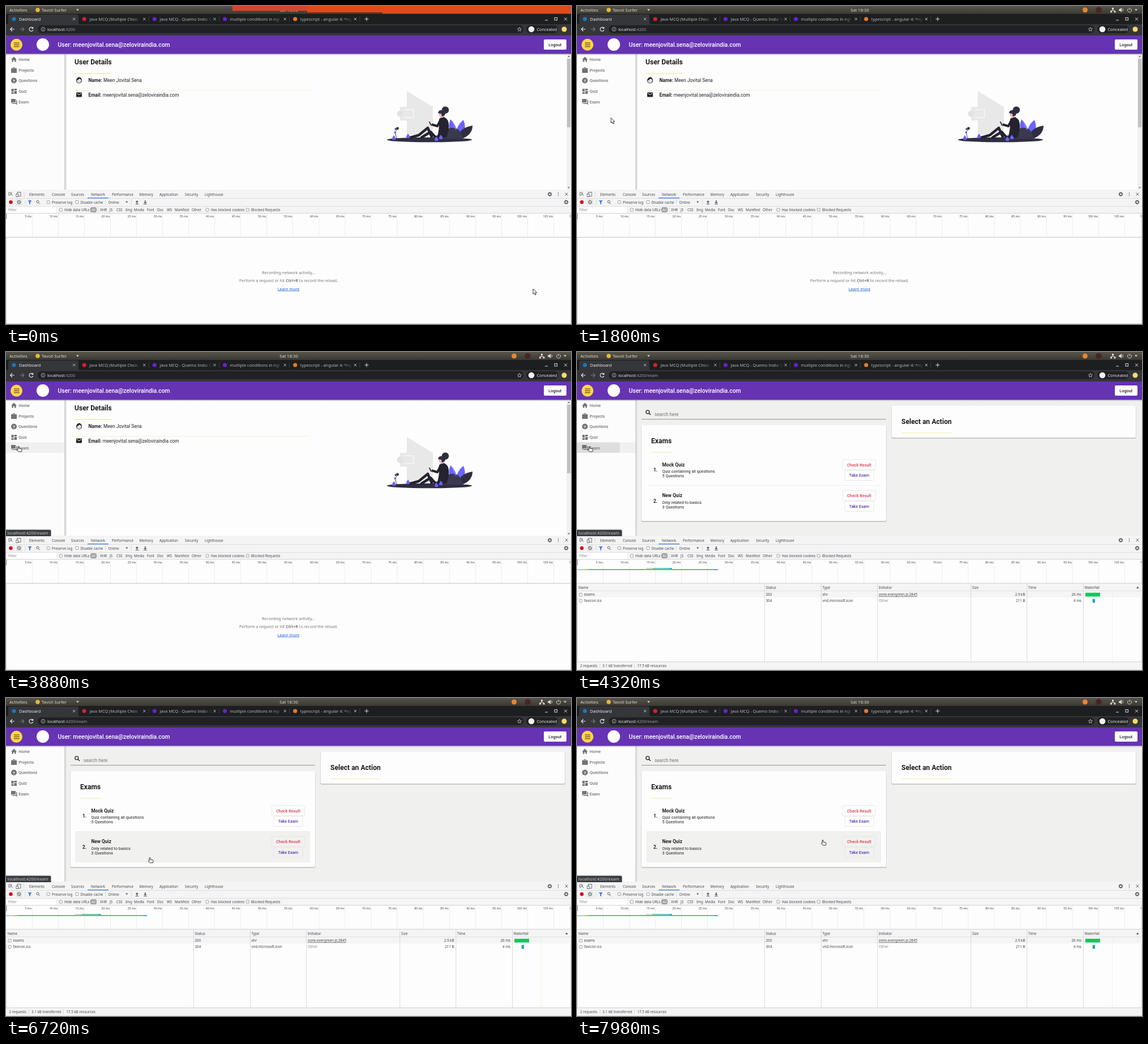
Recreate the animation shown at these times as an HTML page. Size 998x561 px, loop 8 s.

```html
<!DOCTYPE html>
<html lang="en">
<head>
<meta charset="utf-8">
<title>Exam dashboard</title>
<style>
html, body { margin: 0; width: 100%; height: 100%; overflow: hidden; background: #fdfdfd; }
svg { display: block; width: 100vw; height: 100vh; }
svg svg { width: auto; height: auto; }
text { white-space: pre; }
.ui { font-family: "Noto Sans", "Open Sans", sans-serif; }
.app { font-family: Roboto, sans-serif; }
</style>
</head>
<body>
<svg id="stage" viewBox="0 0 998 561" xmlns="http://www.w3.org/2000/svg"></svg>
<script>
const LOOP = 8000;
const PAGE_AT = 4150, FOOTER_AT = 4300, CLICK_AT = 4110, BLUR_AT = 6120;
const EMAIL = 'meenjovital.sena@zeloviraindia.com';

// Drawing helpers
const text = (x, y, s, size, fill, cls = 'ui', extra = '') =>
  `<text class="${cls}" x="${x}" y="${y}" font-size="${size}" fill="${fill}" ${extra}>${s}</text>`;
const rect = (x, y, w, h, fill, extra = '') =>
  `<rect x="${x}" y="${y}" width="${w}" height="${h}" fill="${fill}" ${extra}/>`;
const circle = (x, y, r, fill, extra = '') => `<circle cx="${x}" cy="${y}" r="${r}" fill="${fill}" ${extra}/>`;
const path = (d, fill, extra = '') => `<path d="${d}" fill="${fill}" ${extra}/>`;
const line = (d, stroke, width = 1, extra = '') =>
  `<path d="${d}" fill="none" stroke="${stroke}" stroke-width="${width}" ${extra}/>`;
const group = (id, ...parts) => `<g id="${id}">${parts.join('')}</g>`;
const gradient = (id, from, to, axis = 'x2="0" y2="1"') =>
  `<linearGradient id="${id}" ${axis}><stop ${from}/><stop offset="1" ${to}/></linearGradient>`;
const BOLD = 'font-weight="700"', MEDIUM = 'font-weight="500"';
const MIDDLE = 'text-anchor="middle"', END = 'text-anchor="end"';
const app = (x, y, s, size, fill = '#222', extra = '') => text(x, y, s, size, fill, 'app', extra);
const dev = (x, y, s, fill = '#45484c', extra = '') => text(x, y, s, 6.24, fill, 'ui', extra);
const checkbox = (x, y) => rect(x, y, 5, 5, '#fff', 'rx="1" stroke="#777" stroke-width=".7"');

const gradients = gradient('bar', 'stop-color="#57544b"', 'stop-color="#3b3933"') +
  gradient('shade', 'stop-color="#555" stop-opacity=".4"', 'stop-color="#555" stop-opacity="0"') +
  gradient('fade', 'stop-color="#1d1e20" stop-opacity="0"', 'stop-color="#1d1e20"', '');

function systemBar() {
  const ink = '#dedbd5';
  return rect(0, 0, 998, 14, 'url(#bar)') +
    text(6, 10, 'Activities', 7.6, ink) + circle(56, 7, 3.8, '#e5b83a') +
    text(63, 10, 'Tavoli Surfer', 7.6, ink) + path('M124 5.5h5l-2.5 3z', ink) +
    text(499.5, 10, 'Sat 18:30', 7.6, ink, 'ui', MIDDLE) +
    circle(897.5, 7, 4.5, '#e9852f') + circle(921.5, 7, 5.3, '#4b2523') +
    line('M943 10v-2h7v2M946.5 8V5', ink) + rect(945, 3, 3, 3, ink) +
    rect(942, 9, 3, 2.5, ink) + rect(948.5, 9, 3, 2.5, ink) +
    path('M957 5.5h2l3-2.5v8l-3-2.5h-2z', ink) + line('M963.5 4.5q2 2.5 0 5', ink) +
    line('M974 4.5a3.5 3.5 0 1 0 4 0M976 3v4', ink) + path('M985 5.5h5l-2.5 3z', ink);
}

function browser() {
  const tabs = [
    ['Dashboard', '#1878bd'], ['Java MCQ (Multiple Choic', '#d3222b'], ['Java MCQ - Quemo India Se', '#6b20d0'],
    ['multiple conditions in ngi', '#6b20d0'], ['typescript - angular 4: *ng', '#e87a28']
  ].map(([title, color], i) => {
    const x = 14 + 124.2 * i;
    return circle(x, 23, 3.6, color) +
      `<svg x="${x + 8}" y="14" width="93" height="18" style="width:93px;height:18px">${text(1, 11.5, title, 7.4, i ? '#b4b6b9' : '#eee')}</svg>` +
      (i ? rect(x + 86, 17, 15, 13, 'url(#fade)') + line(`M${x + 114} 18v10`, '#4a4b4e', .7) : '') +
      line(`M${x + 104} 20.8l4.4 4.4m0-4.4l-4.4 4.4`, '#ccc', .9);
  }).join('');
  return rect(0, 14, 998, 18, '#1d1e20') + path('M1 32q3 0 3-3V18q0-3 3-3H125q3 0 3 3v11q0 3 3 3z', '#35363a') + tabs +
    line('M633.5 23h7m-3.5-3.5v7M952 25h5M986 20.5l5 5m0-5l-5 5', '#ddd') +
    rect(969, 20.5, 4.5, 4.5, 'none', 'stroke="#ddd"') +
    rect(0, 32, 998, 20, '#35363a') + rect(56, 34, 858, 14, '#202124', 'rx="7"') +
    line('M15 41H8m3-3.5L7.7 41 11 44.5', '#eee', 1.1) +
    line('M24.5 41h7m-3-3.5l3.3 3.5-3.3 3.5', '#77787b', 1.1) +
    line('M47 38.8a3.4 3.4 0 1 0 .7 3.2M47.7 37v2.5h-2.5', '#eee', 1.1) +
    circle(65.5, 41, 3.4, 'none', 'stroke="#aaa"') + line('M65.5 40.5v2.5M65.5 38.5v1', '#ccc', .9) +
    text(73, 43.7, 'localhost<tspan fill="#9a9c9f">:4200<tspan id="route">/exam</tspan></tspan>', 7.24, '#e8e8e8') +
    path('M907 37.5l1 2.4 2.6.2-2 1.7.6 2.5-2.2-1.3-2.2 1.3.6-2.5-2-1.7 2.6-.2z', 'none', 'stroke="#ccc" stroke-width=".8"') +
    rect(919, 34, 56, 14, '#202124', 'rx="7"') + circle(928, 41, 5.3, '#f1f1f1') +
    text(937.5, 43.7, 'Concealed', 7.3, '#e8e8e8') + circle(986, 41, 4.5, '#f5dc6d');
}

function appFrame() {
  const grey = '#737373';
  const icons = [
    path('M9 94.5l5-5 5 5h-1.5v4h-2.5v-3h-2v3h-2.5v-4z', grey),
    path('M9 110h3v-2h4v2h3v8H9zM13 109v1h2v-1z', grey, 'fill-rule="evenodd"'),
    circle(14, 131.5, 5, grey) + text(14, 134.5, '?', 8, '#fff', 'app', `${MIDDLE} ${BOLD}`),
    rect(9.5, 146, 4, 5, grey) + rect(14.5, 146, 4.5, 3, grey) + rect(9.5, 152, 4, 3, grey) + rect(14.5, 150, 4.5, 5, grey),
    path('M9 164h8v6h-6l-2 2zM18 166h1.5v8.5l-2-2H11v-1.5h7z', grey)
  ];
  const menu = ['Home', 'Projects', 'Questions', 'Quiz', 'Exam'].map((label, i) =>
    icons[i] + app(22.3, 96.8 + 18.7 * i, label, 7.3, grey, MEDIUM)).join('');
  return rect(0, 85, 103, 239, '#fcfcfc') + rect(103, 85, 1, 239, '#d0d0d0') + rect(104, 85, 2.5, 239, '#888', 'opacity=".3"') +
    group('exam-focus', rect(0, 159.5, 103, 18.5, '#f0f0f0')) +
    `<svg y="159.5" width="103" height="18.5" style="width:103px;height:18.5px">${circle(23, 9, 0, '#dedede', 'id="ripple"')}</svg>` + menu +
    rect(0, 52, 998, 32.5, '#6633b3') + rect(0, 84.5, 998, 2.5, 'url(#shade)') +
    circle(18.5, 68.3, 10.5, '#ffd54a') + line('M14 65.3h9.5m-9.5 3.2h9.5m-9.5 3.2h9.5', '#222', 1.1) +
    circle(65, 68, 11, '#fff') + app(91.5, 71.8, 'User: ' + EMAIL, 10.45, '#fff', MEDIUM) +
    rect(950, 59, 40, 18, '#fff', 'rx="2"') + app(969.8, 71, 'Logout', 7.3, '#222', `${MEDIUM} ${MIDDLE}`);
}

function illustration() {
  const dark = '#2f2e41', violet = '#6c63ff', cloth = '#24232f', skin = '#f3b5ba';
  return path('M708 150l46 28v52l-46-4z', '#e8e8e8') + rect(696, 178, 27, 24, '#e8e8e8') + circle(696, 190, 5.5, '#e2e2e2') +
    line('M703 183h17v14h-17', '#f8f8f8', 1.5) +
    `<ellipse cx="748" cy="236" rx="75" ry="4.3" fill="${dark}"/>` +
    path('M785 226q-5-13 0-26 11 9 13 30zM795 230q-1-18 13-29 7 17-4 31z', violet) +
    path('M800 233q-1-18 24-22 0 15-16 22z', dark) +
    path('M773 234q0-16 12-19 14-2 19 10l3 9z', '#3a3950') +
    line('M789 205q3 8 6 14', '#a9a4ff', .8) +
    // Seated reader
    line('M714 232l15-4 16-13 7 16', cloth, 4.5, 'stroke-linejoin="round" stroke-linecap="round"') +
    line('M734 232l16-10 8 9 17-1', cloth, 4.5, 'stroke-linejoin="round" stroke-linecap="round"') +
    path('M765 200q3-5 9-4 7 3 8 12 1 12-4 24h-17q5-14 4-32z', cloth) +
    line('M768 200l-6 12-10-3', cloth, 4, 'stroke-linejoin="round"') +
    path('M766 192l6-2 2 6-7 2z', skin) + circle(750, 209, 2, skin) + line('M747.5 204l4 7', cloth, 1.6) +
    circle(768, 191, 3.8, skin) + path('M763 189q1-6 8-5 7 2 4 9l-5 2-1-5z', dark) + circle(776, 183.5, 6.3, dark) +
    line('M691 234q-6-9 0-18', dark, .9) + circle(691.5, 216, 2.4, dark) + circle(687, 223, 1.7, violet) + circle(688, 217, 1.5, dark) +
    [[685, 233], [710, 230], [760, 235], [768, 232]].map(([x, y]) => path(`M${x} ${y - 5}q7 8 0 8q-6 0 0-8z`, violet)).join('');
}

function homePage() {
  return group('home', rect(107, 86, 891, 238, '#fdfdfd'),
    app(121, 103, 'User Details', 12.1, '#1c1c1c', BOLD), rect(121, 118.5, 65, 1, '#f3dc8c'),
    circle(129, 131.5, 4.5, 'none', 'stroke="#222" stroke-width="1.2"'),
    path('M124.5 131q4-.3 5.2-3 1.5 2 4 2-1-4.5-4.700-4.500-4 .5-4.500 5.500z', '#222'),
    circle(127.3, 132.5, .7, '#222'), circle(130.7, 132.5, .7, '#222'),
    app(145.5, 134, `<tspan ${BOLD}>Name:</tspan> Meen Jovital Sena`, 8.32),
    rect(113, 148.5, 423, .8, '#f3edbd'),
    rect(124, 152.5, 10, 8, '#222', 'rx="1"'), line('M125 154l4 2.7 4-2.7', '#fff'),
    app(145.5, 159.5, `<tspan ${BOLD}>Email:</tspan> ${EMAIL}`, 8.32),
    illustration(),
    rect(990, 86, 8, 238, '#f1f1f1'), rect(991, 93, 6, 121, '#c1c1c1'),
    path('M992 90h4l-2-2.5zM992 319.5h4l-2 2.5z', '#666'));
}

function examPage() {
  const card = (x, y, w, h) => rect(x - .5, y + .5, w + 1, h + 1.2, '#c4c4c4', 'rx="2"') + rect(x, y, w, h, '#fdfdfd', 'rx="2"');
  const button = (x, y, w, label, color) =>
    rect(x, y, w, 18, 'none', 'rx="2" stroke="#e3e3e3" stroke-width=".8"') +
    app(498.5, y + 11.7, label, 7.3, color, `${MEDIUM} ${MIDDLE}`);
  const row = (i, title, info, count) => {
    const y = 181 + 54.5 * i;
    return group('row' + i, rect(122.5, y, 414.5, 54.5, '#f1f1f0')) +
      app(135, y + 30, `${i + 1}.`, 8.3, '#222', BOLD) + app(150.5, y + 20.5, title, 8.32, '#222', BOLD) +
      app(150.5, y + 32, info, 7.28) + app(150.5, y + 40, count + ' Questions', 7.28) +
      button(469, y + 8.8, 58.5, 'Check Result', '#da3d52') + button(473, y + 27.5, 51.5, 'Take Exam', '#5b35ad');
  };
  return group('exams', rect(107, 86, 891, 238, '#f0f0ef'),
    circle(124.8, 105.8, 3, 'none', 'stroke="#222" stroke-width="1.3"'), line('M127 108l3 3', '#222', 1.4),
    app(137, 113, 'search here', 8.2, '#777'), rect(114, 118.2, 432, .9, '#888'),
    card(114, 129, 432, 169), card(556, 95, 431, 56),
    app(573, 126.5, 'Select an Action', 12.1, '#1c1c1c', BOLD), rect(573, 142, 88, 1, '#faeaa6'),
    app(131, 161, 'Exams', 12.1, '#1c1c1c', BOLD), rect(131, 176.5, 37, 1, '#faeaa6'),
    row(0, 'Mock Quiz', 'Quiz containing all questions', 5), row(1, 'New Quiz', 'Only related to basics', 3),
    rect(123, 235.2, 414, .6, '#e6e6e0'));
}

function devtools() {
  const labels = (y, items) => items.map(([x, s]) => dev(x, y, s)).join('');
  const icon = '#5f6368', soft = '#f4f4f5';
  let ruler = '';
  for (let k = 1; k <= 22; k++) {
    const x = 46.05 * k;
    ruler += rect(x, 366, .6, 42, '#e2e2e0') + text(x - 1, 373, `${5 * k} ms`, 5.2, '#444', 'ui', END);
  }
  const gear = (x, y) => circle(x, y, 2.4, 'none', `stroke="${icon}" stroke-width="1.6"`) +
    circle(x, y, 3.5, 'none', `stroke="${icon}" stroke-dasharray="1.37"`);
  return rect(0, 324, 998, 237, '#fdfdfd') + rect(0, 324, 998, 42, soft) +
    rect(0, 339, 998, .7, '#d6d6d8') + rect(0, 353, 998, .7, '#d6d6d8') + rect(0, 365.5, 998, .7, '#c4c4c6') +
    line('M10 329H5v5h2M8 331l4 4m-4-1v-3h3', icon, .9) +
    rect(20, 328.5, 6, 7, 'none', `stroke="${icon}" stroke-width=".9"`) + rect(18, 331.5, 3.5, 5, soft, `stroke="${icon}" stroke-width=".9"`) +
    rect(31.5, 328, .7, 9, '#ccc') +
    labels(334.5, [[41, 'Elements'], [81, 'Console'], [115, 'Sources'], [150, 'Network'], [187, 'Performance'],
      [235.5, 'Memory'], [271, 'Application'], [316, 'Security'], [351, 'Lighthouse']]) +
    rect(144, 338, 37, 1.3, '#3b78e7') + gear(960.5, 332) +
    circle(975.5, 329.5, .8, icon) + circle(975.5, 332, .8, icon) + circle(975.5, 334.5, .8, icon) +
    line('M987.5 329.5l5 5m0-5l-5 5', icon) +
    circle(8.5, 346, 3.2, '#d9001b') + rect(17.5, 340.5, 11, 11, '#e5e5e6') +
    circle(23, 346, 2.8, 'none', `stroke="${icon}"`) + line('M21 344l4 4', icon) +
    rect(33.5, 341.5, .7, 9, '#ccc') + path('M38.5 343h7l-2.5 3v3.5h-2V346z', '#3b78e7') +
    circle(56, 345.2, 2.1, 'none', `stroke="${icon}"`) + line('M57.5 347l2.5 2.5', icon) +
    checkbox(72.3, 343.5) + checkbox(123, 343.5) +
    labels(348.5, [[81, 'Preserve log'], [131.5, 'Disable cache'], [180.5, 'Online']]) +
    path('M211 344.5h4.5l-2.25 3z', icon) + rect(175, 341.5, .7, 9, '#ccc') + rect(221, 341.5, .7, 9, '#ccc') +
    path('M228.5 346h2v2.5h1.8V346h2l-2.9-3zM243 346h2v-3h1.8v3h2l-2.9 2.7z', icon) +
    line('M228.5 349.5h6M243 349.5h6', icon) + gear(989.5, 346) +
    rect(0, 354, 88, 11, '#fff') + dev(4, 362, 'Filter', '#888') +
    checkbox(94.3, 357) + checkbox(353, 357) + checkbox(424.3, 357) +
    rect(149, 355, 11, 9, '#9b9b9b', 'rx="3"') + dev(151, 362, 'All', '#fff') + rect(162.5, 355.5, .7, 8, '#ccc') +
    labels(362, [[103, 'Hide data URLs'], [166, 'XHR'], [183, 'JS'], [195, 'CSS'], [211, 'Img'], [226, 'Media'], [249, 'Font'],
      [267, 'Doc'], [284, 'WS'], [298, 'Manifest'], [328, 'Other'], [362, 'Has blocked cookies'], [433, 'Blocked Requests']]) +
    ruler + rect(0, 366, .8, 10, '#555') + rect(0, 407.6, 998, 1, '#c0bfc9') + rect(0, 408, .6, 153, '#bbb') + rect(997.3, 366, .7, 195, '#ccc') +
    rect(0, 560.3, 998, .7, '#bbb');
}

function emptyLog() {
  const row = (y, s, fill = '#777', extra = '') => text(499, y, s, 7.1, fill, 'ui', `${MIDDLE} ${extra}`);
  return group('empty', row(472.5, 'Recording network activity…'),
    row(487, `Perform a request or hit <tspan ${BOLD}>Ctrl+R</tspan> to record the reload.`),
    row(501.5, 'Learn more', '#1a62d0', 'text-decoration="underline"'));
}

function requestLog() {
  const columns = [0, 331, 431, 530.5, 695.5, 794.5, 894];
  const header = ['Name', 'Status', 'Type', 'Initiator', 'Size', 'Time', 'Waterfall']
    .map((s, i) => dev(columns[i] + 2.5, 417.5, s)).join('');
  const request = (y, values) => checkbox(4, y - 4.5) + values.map((s, i) => {
    if (i >= 4) return dev(columns[i + 1] - 3, y, s, '#444', END);
    const link = s.startsWith('zone') ? 'text-decoration="underline"' : '';
    return dev(i ? columns[i] + 2.5 : 12.5, y, s, s === 'Other' ? '#888' : '#444', link);
  }).join('');
  return group('log',
    rect(0, 383, 249, 1.5, '#17bd62'), rect(0, 383, 13, 1.5, '#c7c7c7'), rect(13, 383, 7, 1.5, '#e8b04a'),
    rect(122, 381, 14, 1.5, '#c7c7c7'), rect(134, 381, 34, 1.5, '#45b7a0'), rect(163, 381, 5, 1.5, '#1aa4dc'), rect(243, 383, 6, 1.5, '#1aa4dc'),
    rect(0, 408.6, 998, 13, '#f4f4f5'), rect(0, 421.5, 998, .7, '#ccc'), rect(0, 422, 998, 11, '#f5f5f5'),
    ...columns.slice(1).map(x => rect(x, 409, .7, 137, '#cbcbce')), rect(945, 422, .6, 124, '#eeeec9'),
    header, path('M988 417h4.5l-2.25-3.5z', '#555'),
    request(430, ['exams', '200', 'xhr', 'zone-evergreen.js:2845', '2.9 kB', '26 ms']),
    request(441, ['favicon.ico', '304', 'vnd.microsoft.icon', 'Other', '211 B', '4 ms']),
    rect(898, 424.7, 26, 6.6, '#0cc95a'), rect(909.5, 436, 1.5, 6, '#ddd'), rect(911, 435.7, 4, 6.6, '#14a6c4')) +
    group('footer', rect(0, 546, 998, 14.5, '#f4f4f5'), rect(0, 546, 998, .7, '#c4c4c8'),
      dev(5.5, 556, '2 requests'), dev(45, 556, '3.1 kB transferred'), dev(106.5, 556, '17.5 kB resources'),
      rect(40, 549, .7, 9, '#ccc'), rect(101, 549, .7, 9, '#ccc'));
}

const banner = group('banner', rect(400, 0, 132, 8.5, '#d9432b'), rect(532, 0, 466, 13.5, '#e04a1b'), rect(532, 11.5, 133, 2, '#33302b'));
const linkHint = group('hint', path('M0 313.5h77q2.5 0 2.5 2.5v9H0z', '#3b3e42'), text(2.5, 321.5, 'localhost:4200/exam', 7.4, '#c9cbce'));
const pointer = group('pointer',
  group('arrow', path('M0 0v9.2l2.1-1.9 1.5 3.5 1.7-.7-1.5-3.4h2.9z', '#fff', 'stroke="#222" stroke-width=".9"')),
  group('hand', path('M-.8 1q.8-1.5 1.7 0v3l4.2.8q1.2.3 1 1.5l-.8 3.5H0l-2.6-3.3q.3-1.3 1.8 0z', '#fff', 'stroke="#222" stroke-width=".9"')));

document.getElementById('stage').innerHTML = gradients + systemBar() + banner + browser() + homePage() + examPage() + appFrame() +
  devtools() + emptyLog() + requestLog() + linkHint + pointer;

// Pointer path: time, x, y
const track = [
  [100, 931, 499], [840, 430, 325], [940, 430, 325], [1080, 353, 266], [1680, 62, 198], [1780, 62, 198], [2350, 8, 177],
  [2700, 8, 177], [3200, 22, 166], [5300, 22, 166], [5980, 113, 203], [6120, 150, 214], [6720, 254, 281], [6960, 254, 281],
  [7700, 400, 260], [7800, 400, 260], [7980, 434, 250]
];

function pointerAt(t) {
  const next = track.findIndex(p => p[0] > t);
  if (next === 0) return track[0].slice(1);
  if (next < 0) return track.at(-1).slice(1);
  const [t0, x0, y0] = track[next - 1], [t1, x1, y1] = track[next];
  const k = (t - t0) / (t1 - t0);
  return [x0 + (x1 - x0) * k, y0 + (y1 - y0) * k];
}

const el = id => document.getElementById(id);
const show = (id, on) => el(id).setAttribute('visibility', on ? 'visible' : 'hidden');

function render(t) {
  const [x, y] = pointerAt(t);
  const loaded = t >= PAGE_AT;
  const overExam = x < 103 && y > 159.5 && y < 178 && t > 2700;
  const inList = loaded && x > 122.5 && x < 537;
  const overRow = [inList && y > 181 && y < 235.5, inList && y >= 235.5 && y < 290];
  show('banner', t < 100);
  show('home', !loaded);
  show('empty', !loaded);
  show('exams', loaded);
  show('log', loaded);
  show('route', loaded);
  show('footer', t >= FOOTER_AT);
  show('hint', t >= 3460);
  show('exam-focus', overExam || (t >= CLICK_AT && t < BLUR_AT));
  overRow.forEach((on, i) => show('row' + i, on));
  const hand = overExam || overRow.some(Boolean);
  show('hand', hand);
  show('arrow', !hand);
  const rippleAge = t - CLICK_AT;
  el('ripple').setAttribute('r', Math.max(0, Math.min(85, rippleAge * .25)));
  el('ripple').setAttribute('opacity', Math.max(0, Math.min(1, (700 - rippleAge) / 300)));
  el('pointer').setAttribute('transform', `translate(${x} ${y})`);
}

const start = performance.now();
function tick() {
  render((performance.now() - start) % LOOP);
  requestAnimationFrame(tick);
}
tick();
</script>
</body>
</html>
```
